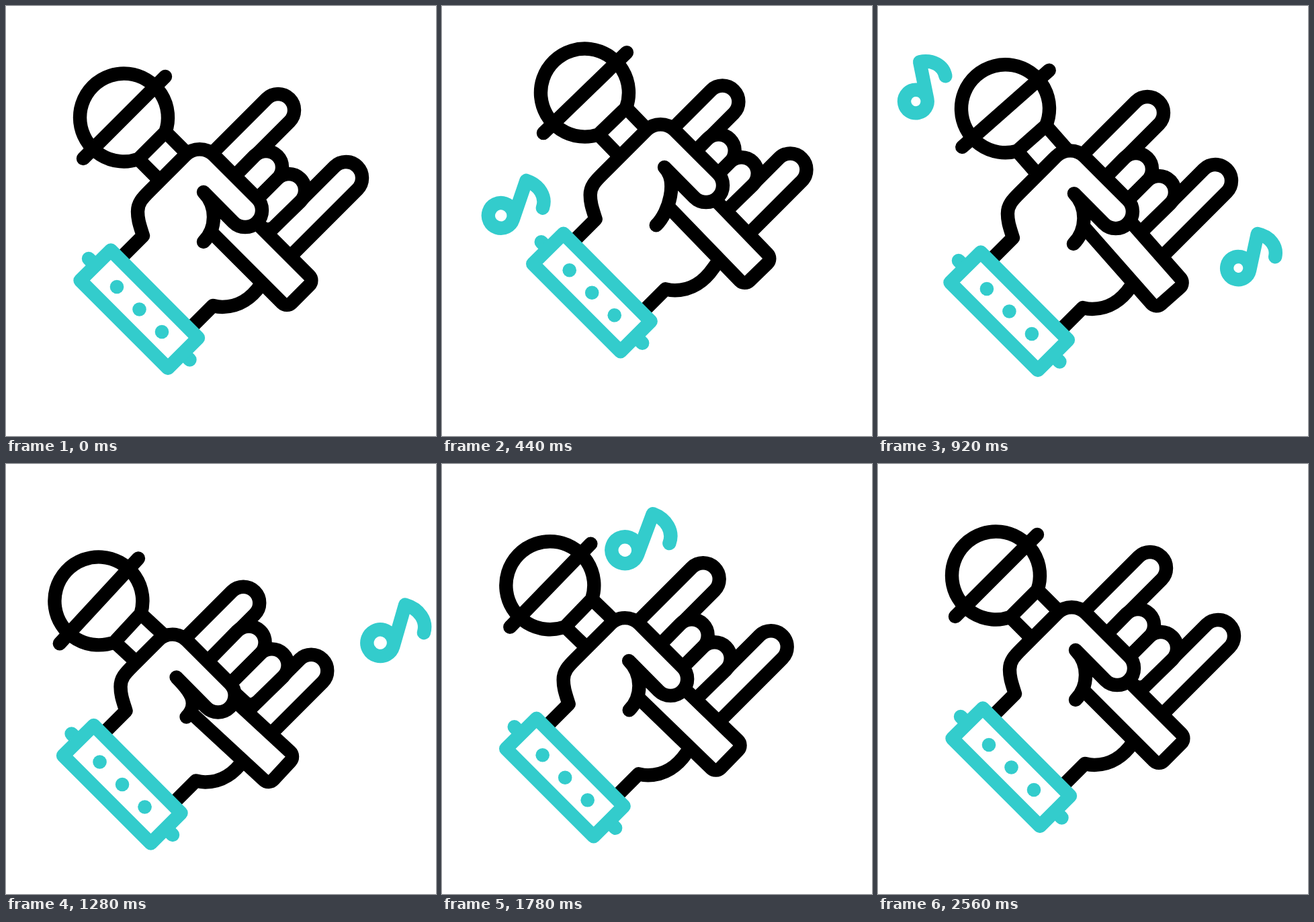
An HTML page that plays this animation: 640x640 px, repeating every 3.6 s.

```html
<!DOCTYPE html>
<html lang="en">
<head>
<meta charset="utf-8">
<title>Hand with microphone</title>
<style>
  html, body { margin: 0; width: 100%; height: 100%; overflow: hidden; background: #fff; }
  svg { display: block; width: 100vw; height: 100vh; }
  path, circle { fill: #fff; stroke: #000; stroke-width: 20.4; stroke-linecap: round; stroke-linejoin: round; }
  .line { fill: none; }
  .teal { stroke: #3cc; }
  .dot { fill: #3cc; stroke: none; }
</style>
</head>
<body>
<svg viewBox="0 0 640 640">
  <g id="notes"></g>
  <g id="horns">
    <path d="M300.5 225.5 388 138A24 24 0 0 1 422 172L334.5 259.5"/>
    <path d="M387 341 489 239A24 24 0 0 1 523 273L423 373"/>
  </g>
  <g id="fist">
    <path d="M322 272 370 223A24 24 0 0 1 404 257L355.5 305.5"/>
    <path d="M355.5 305.5 404 257A24 24 0 0 1 438 291L400 328Q391 336 382 330L358 308"/>
    <path class="line" d="M273 481 308 446C314 447.5 318 448 322 448C347 448 366 434 379 415L390 400"/>
  </g>
  <g id="mic">
    <path d="M237.4 187.4 451.4 401.4A10 10 0 0 1 451.4 415.6L425 442A10 10 0 0 1 411 442L196.9 227.9"/>
    <path d="M237.4 187.4A65.5 65.5 0 1 0 196.9 227.9Z"/>
    <path class="line" d="M237 105 115 227"/>
  </g>
  <path id="hand"/>
  <g id="band">
    <path class="teal" d="M123 376 136 389M273.5 526.5 260 513"/>
    <path class="teal" d="M156 363.5 110.5 408.5 241 539 286 494Z"/>
    <circle class="dot" cx="165" cy="418" r="10.3"/>
    <circle class="dot" cx="198.5" cy="451.5" r="10.3"/>
    <circle class="dot" cx="232" cy="485" r="10.3"/>
  </g>
</svg>
<script>
const LOOP = 3600;
const LAG = 70;
const $ = id => document.getElementById(id);

// Turning points of the arm, in px towards the upper right, and of the mic, in degrees
const swayKeys = [[0, 0], [400, 25], [920, -3], [1200, -30], [1500, 2], [1620, 9], [1880, -27], [2080, -11.5], [2500, 0]];
const tiltKeys = [[200, 0], [920, 3.6], [1420, -3.6], [2080, 1.1], [2560, 0]];

const noteList = [
  { born: 210, life: 850, x: 158, y: 360, drift: -90, rise: 225 },
  { born: 790, life: 850, x: 539, y: 413, drift: 25, rise: 250 },
  { born: 1420, life: 740, x: 329, y: 165, drift: -4, rise: 97 }
];

// Smooth curve through the keys that never overshoots them
function curve(keys, t) {
  const last = keys.length - 1;
  if (t <= keys[0][0]) return keys[0][1];
  if (t >= keys[last][0]) return keys[last][1];
  const i = keys.findIndex(k => k[0] > t) - 1;
  const slope = k => k < 0 || k >= last ? 0
    : (keys[k + 1][1] - keys[k][1]) / (keys[k + 1][0] - keys[k][0]);
  const tangent = k => {
    const a = slope(k - 1), b = slope(k);
    return a * b > 0 ? 2 * a * b / (a + b) : 0;
  };
  const [t0, from] = keys[i], [t1, to] = keys[i + 1];
  const span = t1 - t0, u = (t - t0) / span, v = 1 - u;
  return from * (1 + 2 * u) * v * v + to * u * u * (3 - 2 * u)
    + span * (tangent(i) * u * v * v - tangent(i + 1) * u * u * v);
}

// All parts slide along the rising diagonal
const place = (id, d, extra = "") =>
  $(id).setAttribute("transform", `translate(${d} ${-d}) ${extra}`);

function handPath(wrist, thumb) {
  const at = d => (x, y) => `${x + d} ${y - d} `;
  const w = at(wrist), h = at(thumb);
  return "M" + w(170, 376) + "L" + w(204, 342)
    + "C" + w(199, 326) + w(196, 318) + w(196, 306)
    + "C" + w(196, 293) + w(203, 286) + w(214, 275)
    + "L" + h(267, 222) + "A30 30 0 0 1 " + h(309.4, 222)
    + "L" + h(373.7, 286.3) + "A25 25 0 0 1 " + h(338.3, 321.7)
    + "L" + h(294, 277)
    + "C" + h(314, 297) + w(314, 331) + w(294, 351);
}

for (const note of noteList) {
  note.el = document.createElementNS("http://www.w3.org/2000/svg", "path");
  note.el.setAttribute("class", "line teal");
  $("notes").append(note.el);
}

// Points are scaled one by one, so the line keeps its weight
function drawNote({ el, born, life, x, y, drift, rise }, t) {
  const p = (t - born) / life;
  const alive = p > 0 && p < 1;
  el.style.display = alive ? "" : "none";
  if (!alive) return;
  const arch = Math.sin(Math.PI * p);
  const size = 1.05 * arch ** 0.2;
  const turn = 38 * arch - 36 * p;
  const cx = x + drift * p + 29 * Math.sign(drift) * arch;
  const cy = y - rise * (p + 0.4 * p ** 3);
  const at = (px, py) => `${(px - 18) * size} ${(py + 22) * size} `;
  const r = 19 * size;
  const arc = `A${r} ${r} 0 1 1 `;
  el.setAttribute("d", "M" + at(19, 0) + arc + at(-19, 0) + arc + at(19, 0)
    + "L" + at(19, -62) + "C" + at(40, -62) + at(55.6, -49) + at(55.6, -31));
  el.setAttribute("transform", `translate(${cx} ${cy}) rotate(${turn})`);
  el.style.strokeWidth = 20.4 * Math.min(1, size / 0.5);
}

function draw(t) {
  const wrist = curve(swayKeys, t);
  const late = curve(swayKeys, t - LAG);
  const thumb = wrist + 0.5 * late;
  const pull = Math.max(late, -0.38 * late);
  const slide = 4 * Math.sin(Math.PI * Math.min(1, t / 2080));
  place("fist", wrist);
  place("band", wrist);
  place("horns", thumb - pull);
  place("mic", 0.85 * thumb + slide, `rotate(${curve(tiltKeys, t)} 358 349)`);
  $("hand").setAttribute("d", handPath(wrist, thumb));
  noteList.forEach(note => drawNote(note, t));
}

function frame() {
  draw(performance.now() % LOOP);
  requestAnimationFrame(frame);
}
frame();
</script>
</body>
</html>
```
